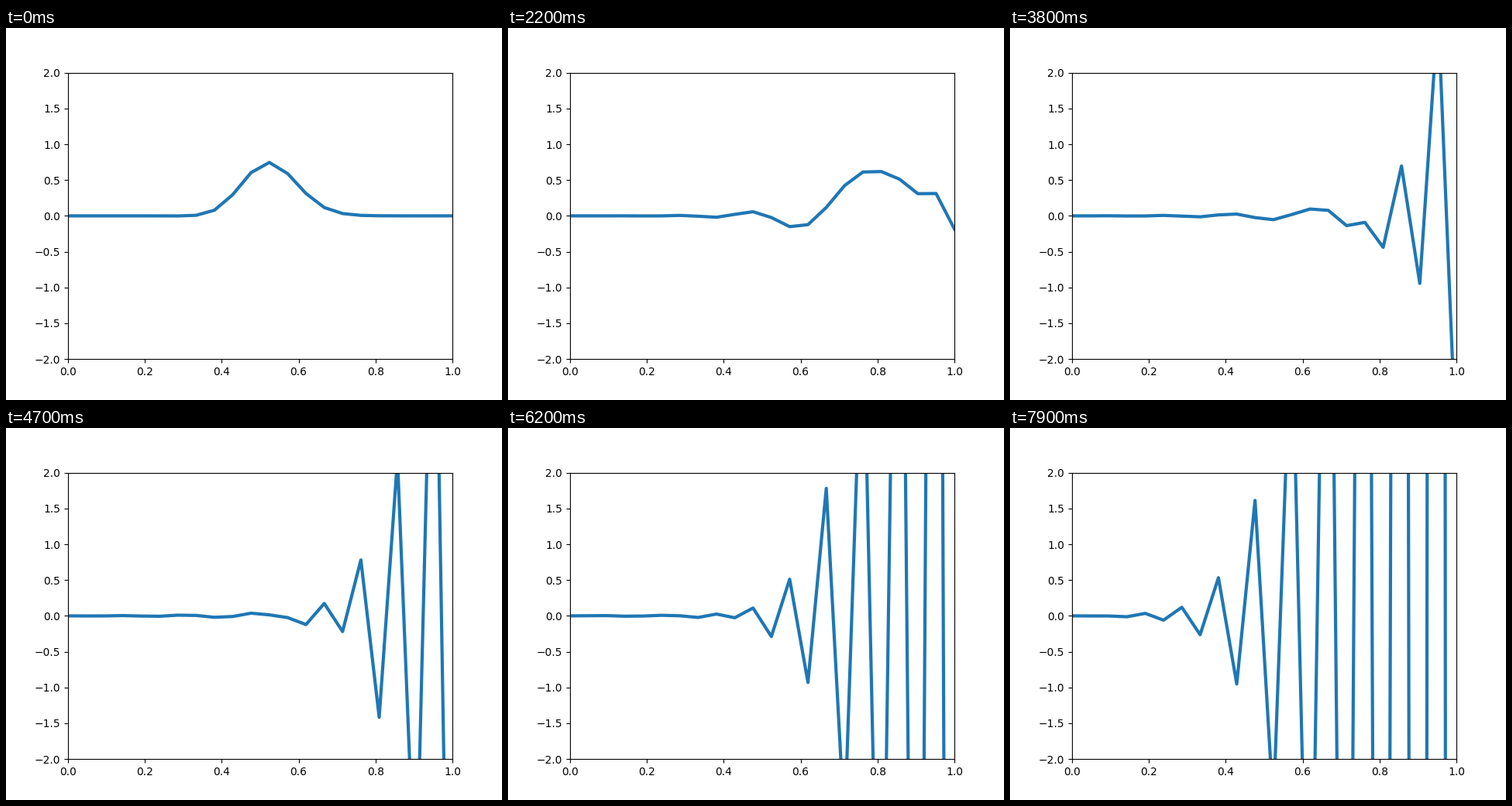
Animation, 640 px wide and 480 px high, one loop 8 s. Source, as a matplotlib script:

```python
import numpy as np
import matplotlib.pyplot as plt
from matplotlib.animation import FuncAnimation

FRAMES, INTERVAL = 80, 100
LEAD = 2              # steps already taken when the loop starts
N = 21                # grid cells
COURANT = 0.3         # advection, cells per step
DISPERSION = 0.05     # extra lag of short waves
DIFFUSION = 0.004


def step_matrix():
    """One Crank-Nicolson step of centred advection with an unstable outlet."""
    n = N + 1
    eye = np.eye(n)
    up, down = np.eye(n, k=1), np.eye(n, k=-1)
    lap = up - 2 * eye + down
    rate = -COURANT / 2 * (up - down) + DIFFUSION * lap
    mass = eye - DISPERSION * lap
    for row in (0, N):
        mass[row] = eye[row]
        rate[row] = 0
    rate[N, N - 1] = -COURANT / 2
    return np.linalg.solve(mass - rate / 2, mass + rate / 2)


def solve(x):
    step = step_matrix()
    u = 0.75 * np.exp(-100 * (x - 0.5) ** 2)
    states = [u]
    for _ in range(FRAMES + LEAD):
        states.append(step @ states[-1])
    return states[LEAD:LEAD + FRAMES]


x = np.linspace(0, 1, N + 1)
states = solve(x)

fig, ax = plt.subplots(figsize=(6.4, 4.8), dpi=100)
ax.set_xlim(0, 1)
ax.set_ylim(-2, 2)
line, = ax.plot(x, states[0], lw=3)


def update(i):
    line.set_ydata(states[i])
    return line,


anim = FuncAnimation(fig, update, frames=FRAMES, interval=INTERVAL,
                     repeat=True, repeat_delay=0)
plt.show()
```
